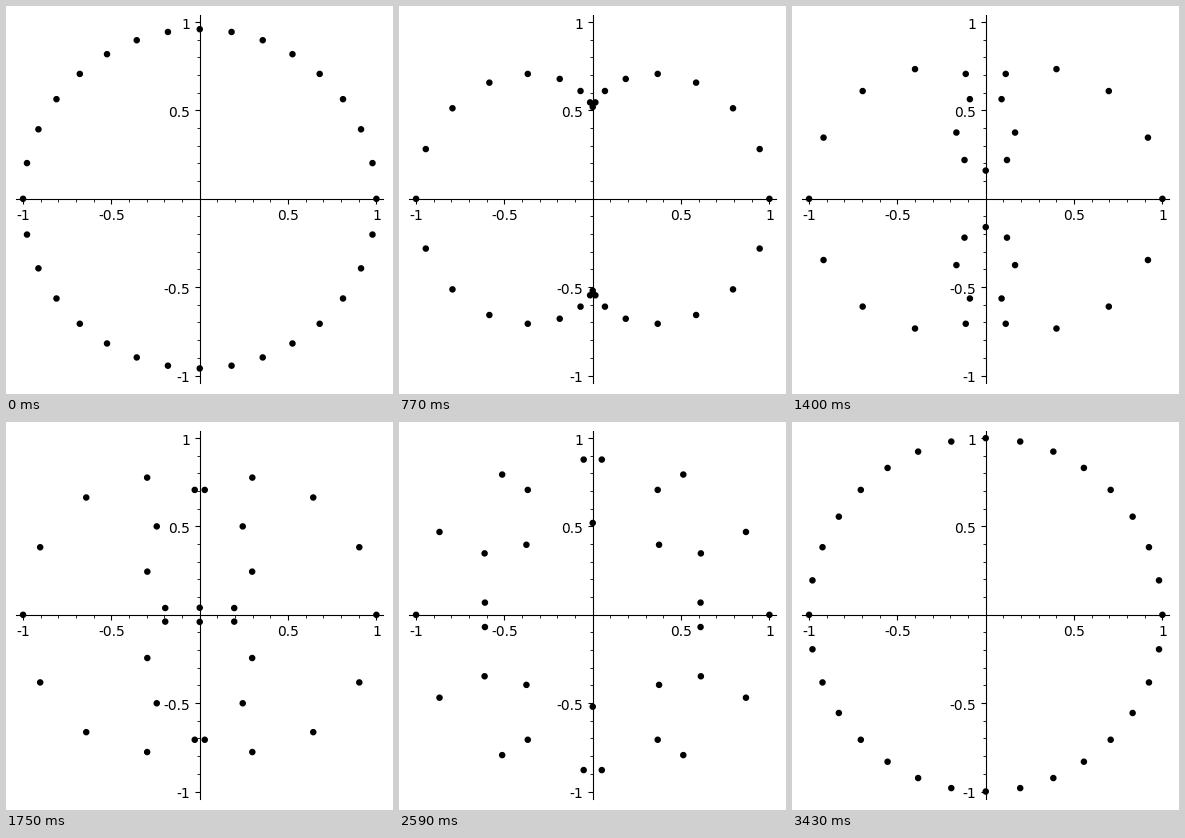
These frames come from a looping animation (387x388 px, 3.5 s). A matplotlib script:

```python
import numpy as np
import matplotlib.pyplot as plt
from matplotlib.animation import FuncAnimation
from matplotlib.transforms import Affine2D

WIDTH, HEIGHT, DPI = 387, 388, 100
FRAMES, INTERVAL = 50, 70
UNIT = 176.672              # pixels per axis unit
LIMIT = 1.04
LEFT, BOTTOM = 10, 11.432   # pixel margins of the axes
SIDE = 2 * LIMIT * UNIT

roots = np.exp(2j * np.pi * np.arange(32) / 32)
cubes = roots ** 3

plt.rcParams["font.family"] = "DejaVu Sans"
fig = plt.figure(figsize=(WIDTH / DPI, HEIGHT / DPI), dpi=DPI, facecolor="white")
ax = fig.add_axes([LEFT / WIDTH, BOTTOM / HEIGHT, SIDE / WIDTH, SIDE / HEIGHT])
ax.set(xlim=(-LIMIT, LIMIT), ylim=(-LIMIT, LIMIT))

for side in ("left", "bottom"):
    ax.spines[side].set_position("zero")
for side in ("right", "top"):
    ax.spines[side].set_visible(False)

major = [-1, -0.5, 0.5, 1]
minor = np.arange(-10, 11) / 10
for axis in (ax.xaxis, ax.yaxis):
    axis.set_ticks(major, labels=[f"{v:g}" for v in major])
    axis.set_ticks(minor, minor=True)

# Labels sit slightly below their ticks.
for label in ax.get_yticklabels():
    label.set_transform(label.get_transform() + Affine2D().translate(0, -0.9))

# One colour per dot keeps sub-pixel positions instead of snapped markers.
dots = ax.scatter(roots.real, roots.imag, s=10, c=["black"] * len(roots),
                  edgecolors="black", linewidths=1.5)


def update(frame):
    """Slide every root of unity along a straight line to its cube."""
    t = (frame + 1) / FRAMES
    z = (1 - t) * roots + t * cubes
    dots.set_offsets(np.column_stack([z.real, z.imag]))
    return (dots,)


anim = FuncAnimation(fig, update, frames=FRAMES, interval=INTERVAL, repeat=True)
plt.show()
```
